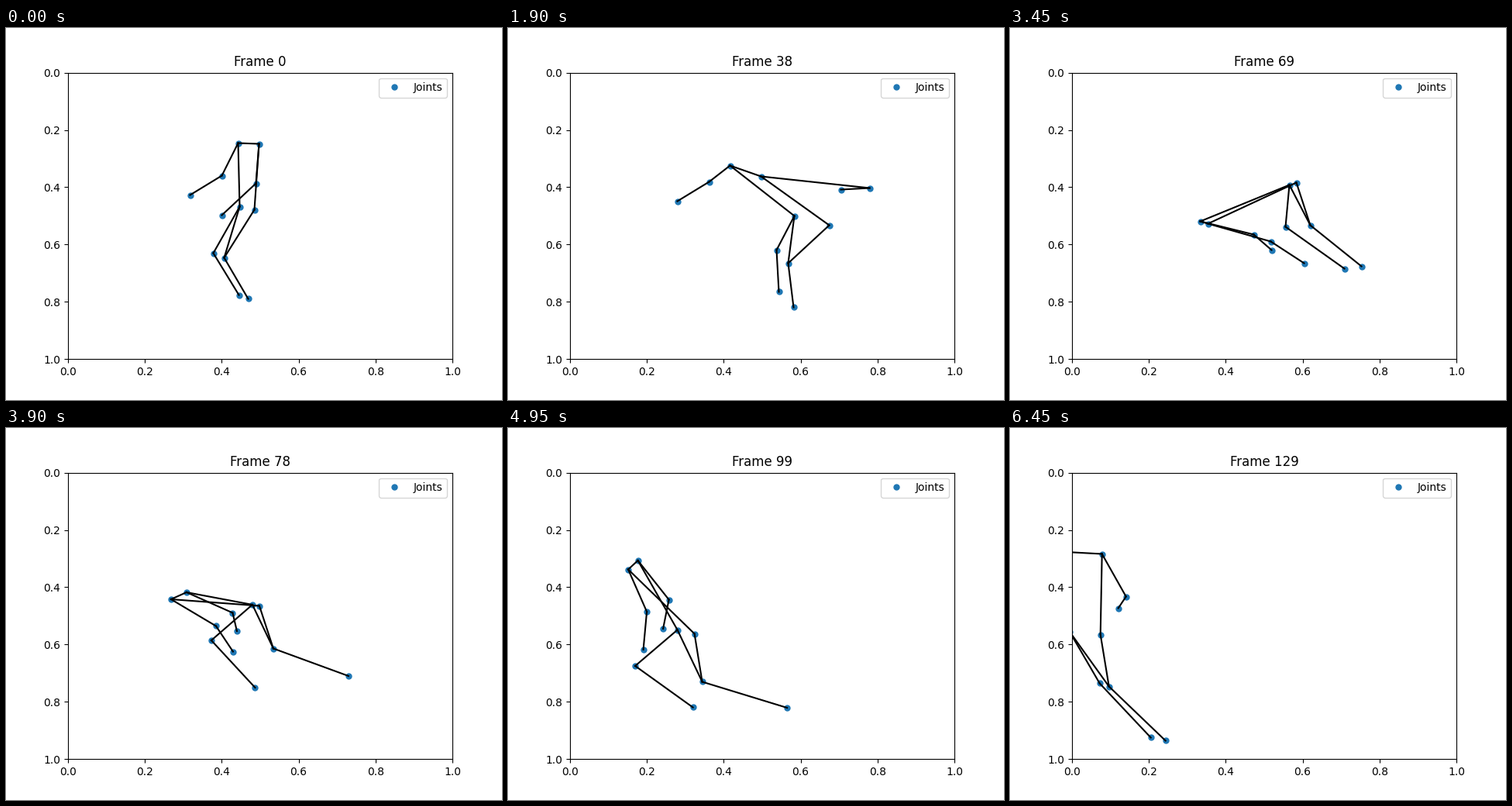
Animation of 640 by 480 pixels, one loop 6500 ms. Source, as a matplotlib script:

```python
import numpy as np
import matplotlib.pyplot as plt
from matplotlib.animation import FuncAnimation

FRAMES, INTERVAL = 130, 50
BONES = [("l_shoulder", "r_shoulder"),
         ("l_shoulder", "l_elbow"), ("l_elbow", "l_wrist"),
         ("r_shoulder", "r_elbow"), ("r_elbow", "r_wrist"),
         ("l_shoulder", "l_hip"), ("r_shoulder", "r_hip"),
         ("l_hip", "l_knee"), ("l_knee", "l_ankle"),
         ("l_hip", "r_knee"), ("r_hip", "r_knee"), ("r_knee", "r_ankle")]

t = np.arange(FRAMES)


def ease(start, end):
    """Smooth rise from 0 to 1 between two moments."""
    u = np.clip((t - start) / (end - start), 0, 1)
    return u * u * (3 - 2 * u)


# Phases of the jump; each one swings the limbs a little further
step, reach, dive = ease(0, 18), ease(18, 38), ease(38, 69)
land, stride, leave = ease(69, 87), ease(87, 111), ease(111, 129)
fling = ease(38, 56) - ease(56, 69)
drift = np.sin(np.pi / 2 * np.clip(t / 38, 0, 1))
run = np.maximum(t - 69, 0)

# Points and limb vectors in stage pixels, x + yj
hip = (301 + 230j + 68 * drift + 12j * step - (9 + 40j) * dive
       - 4.73 * run + 51j * land + 14j * stride - 5j * leave)
hip_line = (19 + 4j + (26 + 8j) * reach - (36 + 15j) * dive
            + 9j * land + (26 - 2j) * stride + 5 * leave)
torso = (-2 - 82j + (9 - 2j) * step + (-90 + 19j) * reach
         + (-32 + 112j) * dive + (60 - 126j) * land
         + (8 - 21j) * stride + (34 - 3j) * leave)
shoulder_line = (27 + 1j + 5 * step + (8 + 13j) * reach - (30 + 11j) * dive
                 + (-60 + 12j) * land + (75 - 7j) * stride
                 + (30 - 5j) * leave)

l_upper = (-21 + 42j - (6 + 21j) * step + (96 - 4j) * dive - 100 * fling
           + (-19 + 19j) * land + (-20 + 29j) * stride - 60 * leave)
l_fore = (-41 + 25j + (19 - 50j) * (step - reach) + (64 - 5j) * dive
          - 100 * fling + (-35 + 7j) * land + (9 + 21j) * stride)
r_upper = (-4 + 51j + (144 - 36j) * reach + (-59 + 8j) * dive
           + (-46 + 23j) * land + (-22 + 17j) * stride + (18 - 8j) * leave)
r_fore = (-44 + 41j + (7 - 39j) * reach + (80 + 26j) * dive
          + (-42 + 10j) * land + (-11 + 22j) * stride - 45j * leave)

l_thigh = (-34 + 60j + (33 - 10j) * step - (22 + 6j) * reach
           + (18 + 10j) * dive - (96 + 16j) * land
           + (93 + 17j) * stride + (47 + 12j) * leave)
r_thigh = (-39 + 62j + (10 - 2j) * step - (24 + 11j) * reach
           + (71 + 6j) * dive + (-16 + 14j) * stride + (9 - 2j) * leave)
l_shin = (33 + 54j - 7 * step - 23 * reach + 73 * dive
          + (-39 + 14j) * land + (75 - 29j) * stride + (-46 + 31j) * leave)
r_shin = (31 + 53j - 11 * step + (-13 + 4j) * reach + (59 - 4j) * dive
          + (105 - 40j) * fling + (62 - 35j) * land
          + (-37 + 31j) * stride + (-18 + 21j) * leave)


def limb(name, root, joint, end, first, second):
    """Chain two limb vectors onto a root point."""
    return {f"{name}_{joint}": root + first, f"{name}_{end}": root + first + second}


shoulder = hip + torso
joints = {"l_hip": hip, "r_hip": hip + hip_line,
          "l_shoulder": shoulder, "r_shoulder": shoulder + shoulder_line}
joints |= limb("l", joints["l_shoulder"], "elbow", "wrist", l_upper, l_fore)
joints |= limb("r", joints["r_shoulder"], "elbow", "wrist", r_upper, r_fore)
joints |= limb("l", joints["l_hip"], "knee", "ankle", l_thigh, l_shin)
joints |= limb("r", joints["r_hip"], "knee", "ankle", r_thigh, r_shin)

# Pixel centres to axes units
index = {name: i for i, name in enumerate(joints)}
path = np.stack(list(joints.values()), axis=1)
motion = np.stack([(path.real - 79.5) / 496, (path.imag - 57.1) / 369.6], axis=2)

fig, ax = plt.subplots(figsize=(6.4, 4.8), dpi=100)
ax.set_xlim(0, 1)
ax.set_ylim(1, 0)
title = ax.set_title("Frame 0")
dots, = ax.plot([], [], "o", color="tab:blue", markersize=5, label="Joints")
bones = [ax.plot([], [], "k-", linewidth=1.5)[0] for _ in BONES]
ax.legend(loc="upper right")


def draw(frame):
    points = motion[frame]
    dots.set_data(*points.T)
    for line, (a, b) in zip(bones, BONES):
        line.set_data(*points[[index[a], index[b]]].T)
    title.set_text(f"Frame {frame}")
    return [dots, title, *bones]


anim = FuncAnimation(fig, draw, frames=FRAMES, interval=INTERVAL,
                     init_func=lambda: draw(0), repeat=True, repeat_delay=0)
plt.show()
```
